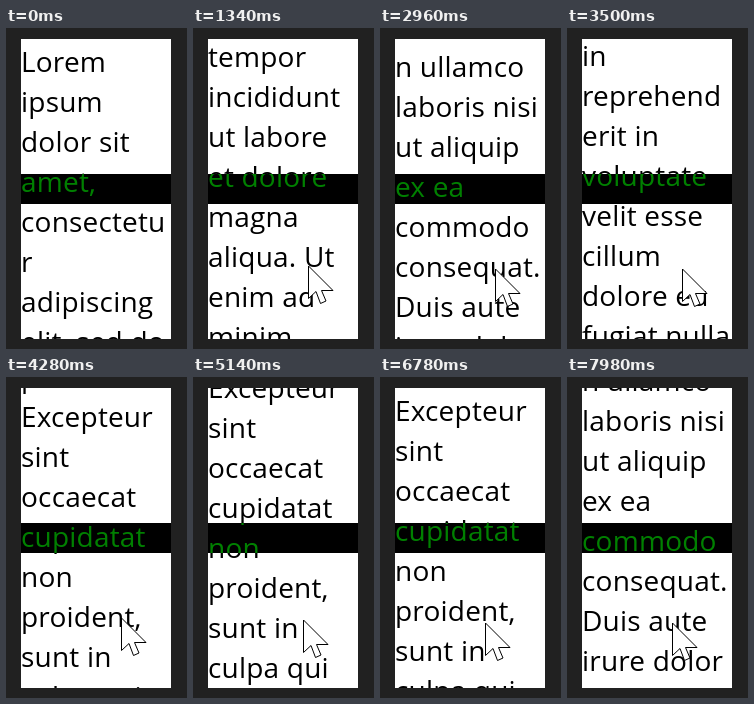
Animation, 181 px wide and 321 px high, one loop 8 s. Source, as an HTML page:

```html
<!DOCTYPE html>
<html lang="la">
<head>
<meta charset="utf-8">
<title>Reading band</title>
<style>
  html, body { margin: 0; width: 100%; height: 100%; overflow: hidden; background: #212121; }
  .page, .band { position: absolute; overflow: hidden; }
  .page { left: 15px; top: 11px; width: 150px; height: 300px; background: #fff; color: #000; }
  .band { left: 0; top: 135px; width: 150px; height: 30px; background: #000; color: green; }
  pre {
    position: absolute; left: 0; top: 0; margin: 0;
    font: 28px/40px "Open Sans", "Noto Sans", sans-serif; letter-spacing: .2px;
  }
  svg { position: absolute; left: 0; top: 0; overflow: visible; }
</style>
</head>
<body>
<div class="page">
  <pre></pre>
  <div class="band"><pre></pre></div>
</div>
<svg id="cursor" width="26" height="40">
  <path d="M.5 0V32.5L8 25.5L12.5 37.5L18 35L13.5 24.5H25Z" fill="#fff" stroke="#000"/>
</svg>
<script>
const LOOP = 8000, BAND_TOP = 135, TEXT_TOP = 2;
const lines = `Lorem|ipsum|dolor sit|amet,|consectetu|r|adipiscing|elit, sed do|eiusmod|tempor|incididunt|ut labore|et dolore|magna|aliqua. Ut|enim ad|minim|veniam,|quis|nostrud|exercitatio|n ullamco|laboris nisi|ut aliquip|ex ea|commodo|consequat.|Duis aute|irure dolor|in|reprehend|erit in|voluptate|velit esse|cillum|dolore eu|fugiat nulla|pariatur.|Excepteur|sint|occaecat|cupidatat|non|proident,|sunt in|culpa qui|officia|deserunt|mollit anim|id est|laborum.`;

const [text, bandText] = document.querySelectorAll('pre');
text.textContent = bandText.textContent = lines.replaceAll('|', '\n');
const cursor = document.getElementById('cursor');

// Wheel swipes: start time, scroll position reached
const swipes = [[900, 380], [1900, 797], [2940, 1169], [3900, 1542],
                [5140, 1715], [5960, 1740], [6530, 1457], [7340, 869]];
// Hand nudges: start time, cursor x, y
const nudges = [[160, 115, 238], [1900, 115, 241], [4820, 110, 243], [5960, 105, 246]];

// Follows the moves, each easing out from wherever the last one left off
function follow(time, moves, duration, from) {
  return moves.reduce((pos, [start, ...target]) => {
    const p = Math.min(1, Math.max(0, (time - start) / duration));
    const left = (1 - p) ** 4;
    return target.map((v, i) => v + (pos[i] - v) * left);
  }, from).map(Math.round);
}

const place = (el, x, y) => el.style.transform = `translate(${x}px, ${y}px)`;

function draw(now) {
  const time = now % LOOP;
  const [scroll] = follow(time, swipes, 800, [0]);
  place(text, 0, TEXT_TOP - scroll);
  place(bandText, 0, TEXT_TOP - scroll - BAND_TOP);
  place(cursor, ...follow(time, nudges, 600, [153, 322]));
  requestAnimationFrame(() => draw(performance.now() - began));
}

const began = performance.now();
draw(0);
</script>
</body>
</html>
```
